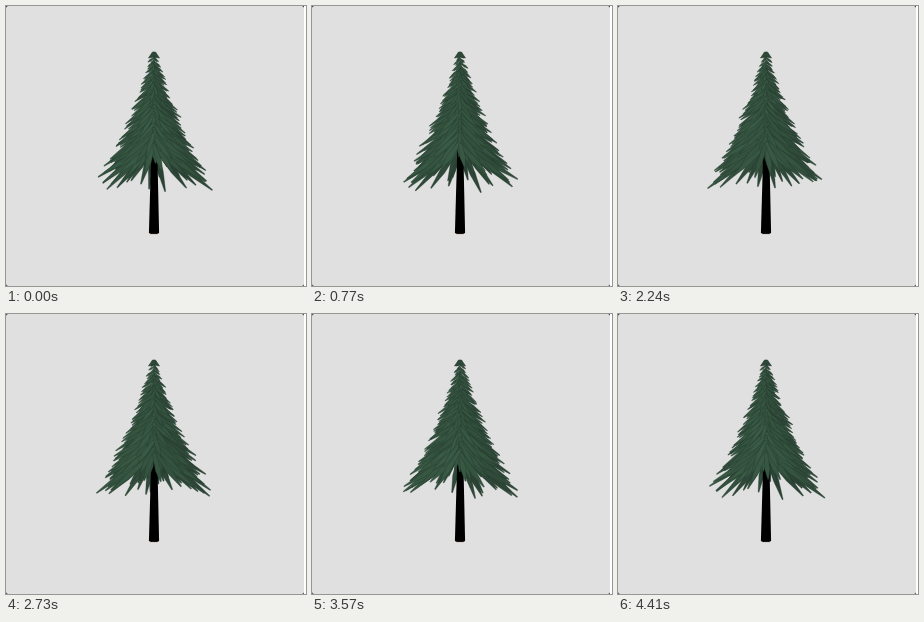
An HTML page with a canvas that plays this animation: 300 px wide and 280 px high, repeating every 4.48 s.

```html
<!DOCTYPE html>
<html lang="en">
<head>
<meta charset="utf-8">
<title>Turning pine</title>
<style>
html, body { margin: 0; width: 100%; height: 100%; overflow: hidden; background: #e0e0e0; }
canvas { display: block; }
</style>
</head>
<body>
<canvas id="stage" width="300" height="280"></canvas>
<script>
const ctx = document.getElementById('stage').getContext('2d');
const LOOP = 4480, STEP = 70, AXIS = 148, NEEDLES = 290;
const GOLDEN = Math.PI * (3 - Math.sqrt(5));

let seed = 41;
function random() {
  seed = (seed * 16807) % 2147483647;
  return seed / 2147483647;
}

// Needles hang from the axis on a golden-angle spiral; the skirt flares towards the base.
const needles = Array.from({ length: NEEDLES }, (_, i) => {
  const depth = 132 * Math.pow((i + 0.5) / NEEDLES, 0.68);
  const fullRadius = 4.5 + 0.29 * depth + 0.0009 * depth * depth;
  const radius = fullRadius * (0.82 + 0.24 * random());
  return {
    angle: i * GOLDEN + 0.3 * random(),
    radius,
    baseY: Math.max(46, 51 + depth - fullRadius * 0.74),
    drop: radius * (0.6 + 0.22 * random()),
    width: 0.8 + fullRadius * 0.033,
    tone: random()
  };
});

function polygon(points, fill, stroke) {
  ctx.beginPath();
  points.forEach(([x, y]) => ctx.lineTo(x, y));
  ctx.closePath();
  ctx.fillStyle = fill;
  ctx.fill();
  if (stroke) {
    ctx.strokeStyle = stroke;
    ctx.lineWidth = 0.6;
    ctx.stroke();
  }
}

function mix(dark, light, k) {
  return `rgb(${dark.map((c, i) => Math.round(c + (light[i] - c) * k))})`;
}

function drawNeedle({ needle, x, z }) {
  const { baseY, drop, width, radius, tone } = needle;
  const dy = drop - z * (z > 0 ? 0.2 : 0.05);
  const length = Math.hypot(x, dy) || 1;
  const nx = -dy / length * width, ny = x / length * width;
  const at = (k, side) => [AXIS + x * k + nx * side, baseY + dy * k + ny * side];
  const light = 0.62 + 0.25 * z / radius - 0.15 * x / radius + 0.3 * (tone - 0.5);
  const fill = mix([40, 60, 49], [57, 90, 68], Math.max(0, Math.min(1, light)));
  polygon([at(0, 0.6), at(0.6, 1), at(1, 0.18), at(1, -0.18), at(0.6, -1), at(0, -0.6)],
    fill, 'rgba(32,50,41,0.5)');
}

function drawTrunk() {
  polygon([[145.4, 140], [151.2, 140], [153.1, 227], [151, 228], [145, 228], [142.9, 227]], '#000');
  ctx.fillStyle = 'rgba(110,70,50,0.5)';
  ctx.fillRect(144, 227.5, 8, 0.7);
}

function drawStage() {
  ctx.fillStyle = '#333';
  ctx.fillRect(0, 0, 298, 280);
  ctx.fillStyle = '#fff';
  ctx.fillRect(298, 0, 2, 280);
  ctx.fillStyle = '#e0e0e0';
  ctx.beginPath();
  ctx.roundRect(0, 0, 298, 280, 2.5);
  ctx.fill();
}

function draw(time) {
  const turn = Math.floor((time % LOOP) / STEP) * STEP / LOOP * Math.PI * 2;
  const placed = needles.map(needle => ({
    needle,
    x: needle.radius * Math.sin(needle.angle + turn),
    z: needle.radius * Math.cos(needle.angle + turn)
  })).sort((a, b) => a.z - b.z);

  drawStage();
  placed.filter(n => n.z < 0).forEach(drawNeedle);
  drawTrunk();
  placed.filter(n => n.z >= 0).forEach(drawNeedle);
  polygon([[146.5, 46], [149.5, 46], [153.5, 52], [148, 51], [142.5, 52]], '#2d4839', '#22372c');
}

const start = performance.now();
function tick() {
  draw(performance.now() - start);
  requestAnimationFrame(tick);
}
tick();
</script>
</body>
</html>
```
